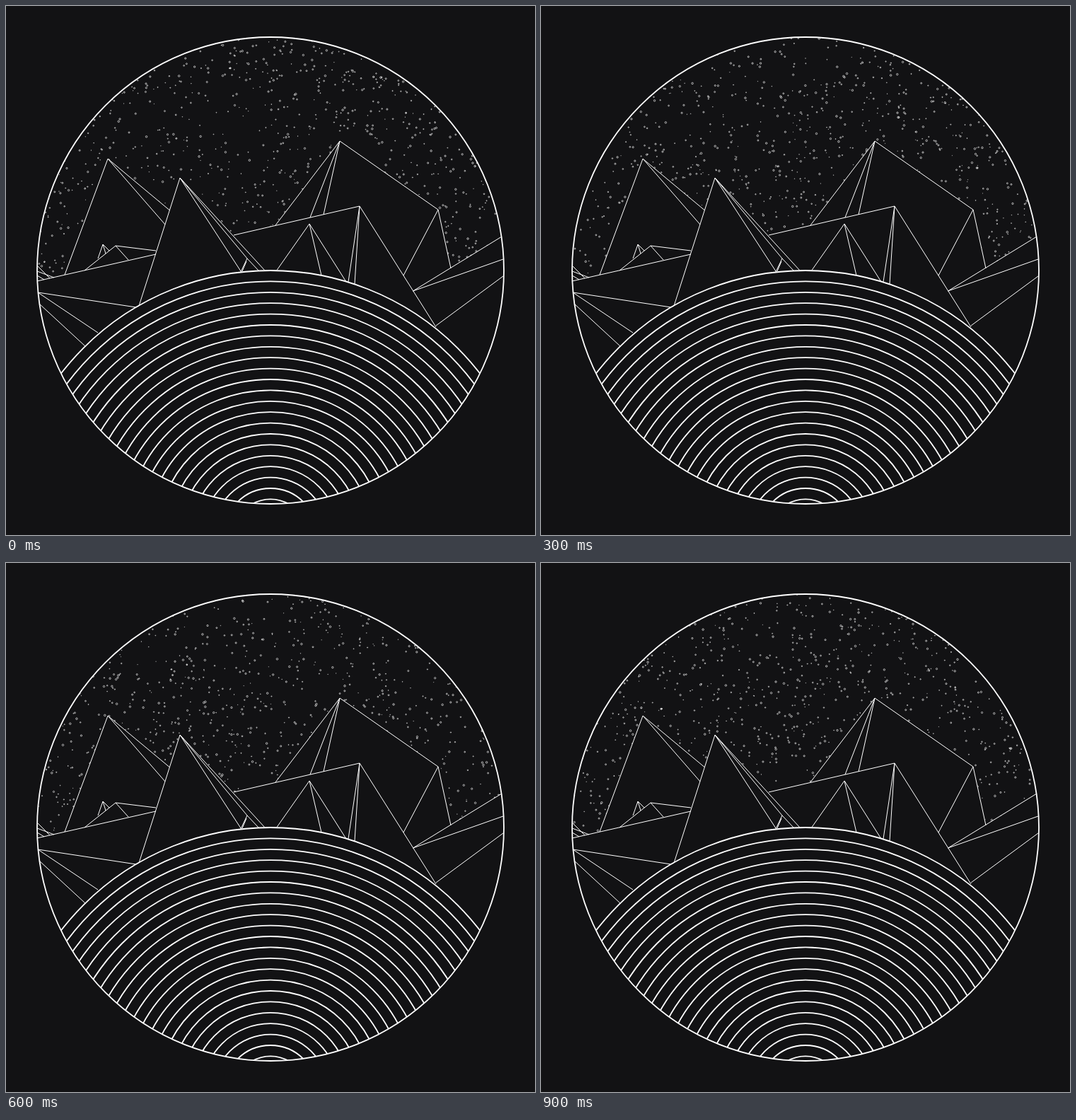
These frames come from a looping animation (748x748 px, 1 s). An HTML page with a canvas:

```html
<!DOCTYPE html>
<html lang="en">
<head>
<meta charset="utf-8">
<title>Night peaks</title>
<style>
html, body { margin: 0; width: 100%; height: 100%; overflow: hidden; background: #121214; }
canvas { display: block; width: 748px; height: 748px; }
</style>
</head>
<body>
<canvas id="stage" width="748" height="748"></canvas>
<script>
const ctx = document.getElementById('stage').getContext('2d');
const BG = '#121214', INK = '#fff';
const MID = 374, RADIUS = 330, STEP = 100, STEPS = 10, STARS = 1250;

// Outline of the visible sky above the peaks
const SKY = 'M44 0 V368 L68 384 L83 380 L144 216 L231 288.5 L246 243 L322 324 ' +
  'L381 310 L472 191 L611 288 L629 371 L701 326 L704 0 Z';

const PEAKS = [
  // left back peak
  'M83 380 L144 216 L231 288.5 M144 216 L225 309',
  // left front peak
  'M188 424 L246 243 L332 375 M246 243 L341 357 L357 374 M246 243 L366 374',
  'M341 357 L332 376 M340 361 L334 375',
  // right back peak
  'M381 310 L472 191 L611 288 L629 371 M430 299 L472 191 L449 295 M611 288 L562 381',
  // right front peaks
  'M322 324 L500 283 L608 454 M484 390 L500 283 L493 393',
  'M383 373.5 L429 308 L446 381 M429 308 L481 390',
  // right slopes
  'M701 326 L575.5 403 L703 358 M703 382 L608 452',
  // left slopes
  'M44 389 L212 351 M45 405 L184 426 L188 424 M45 405 L130 462 M47 421 L112 481',
  // small far peaks
  'M212 346 L155 339 L111 374 M155 339 L173 359',
  'M130 357 L137 337 L146 346 M137 337 L141 350',
  'M44 367 L62 385 M44 375 L68 384 M44 381 L54 387'
].join(' ');

const sky = new Path2D(SKY), peaks = new Path2D(PEAKS);

function random(seed) {
  return () => {
    seed = (seed + 0x6D2B79F5) | 0;
    let t = Math.imul(seed ^ (seed >>> 15), 1 | seed);
    t = (t + Math.imul(t ^ (t >>> 7), 61 | t)) ^ t;
    return ((t ^ (t >>> 14)) >>> 0) / 4294967296;
  };
}

function ring(x, y, r) {
  ctx.beginPath();
  ctx.arc(x, y, r, 0, Math.PI * 2);
  ctx.stroke();
}

function drawStars(step) {
  const rnd = random(step * 7919 + 17);
  ctx.save();
  ctx.clip(sky);
  ctx.lineWidth = 0.65;
  for (let i = 0; i < STARS; i++) {
    ring(44 + rnd() * 660, 44 + rnd() * 345, 0.2 + rnd() * 1.1);
  }
  ctx.restore();
}

function draw(step) {
  ctx.fillStyle = BG;
  ctx.fillRect(0, 0, 748, 748);
  ctx.strokeStyle = INK;
  ctx.lineJoin = 'round';

  ctx.save();
  ctx.beginPath();
  ctx.arc(MID, MID, RADIUS, 0, Math.PI * 2);
  ctx.clip();
  drawStars(step);
  ctx.lineWidth = 1;
  ctx.stroke(peaks);
  ctx.lineWidth = 1.8;
  for (let i = 0; i < 22; i++) ring(MID, 748, 374 - i * 15.4);
  ctx.restore();

  ctx.lineWidth = 1.8;
  ring(MID, MID, RADIUS);
}

let shown = -1;
function tick() {
  const step = Math.floor(performance.now() / STEP) % STEPS;
  if (step !== shown) draw(shown = step);
  requestAnimationFrame(tick);
}
tick();
</script>
</body>
</html>
```
